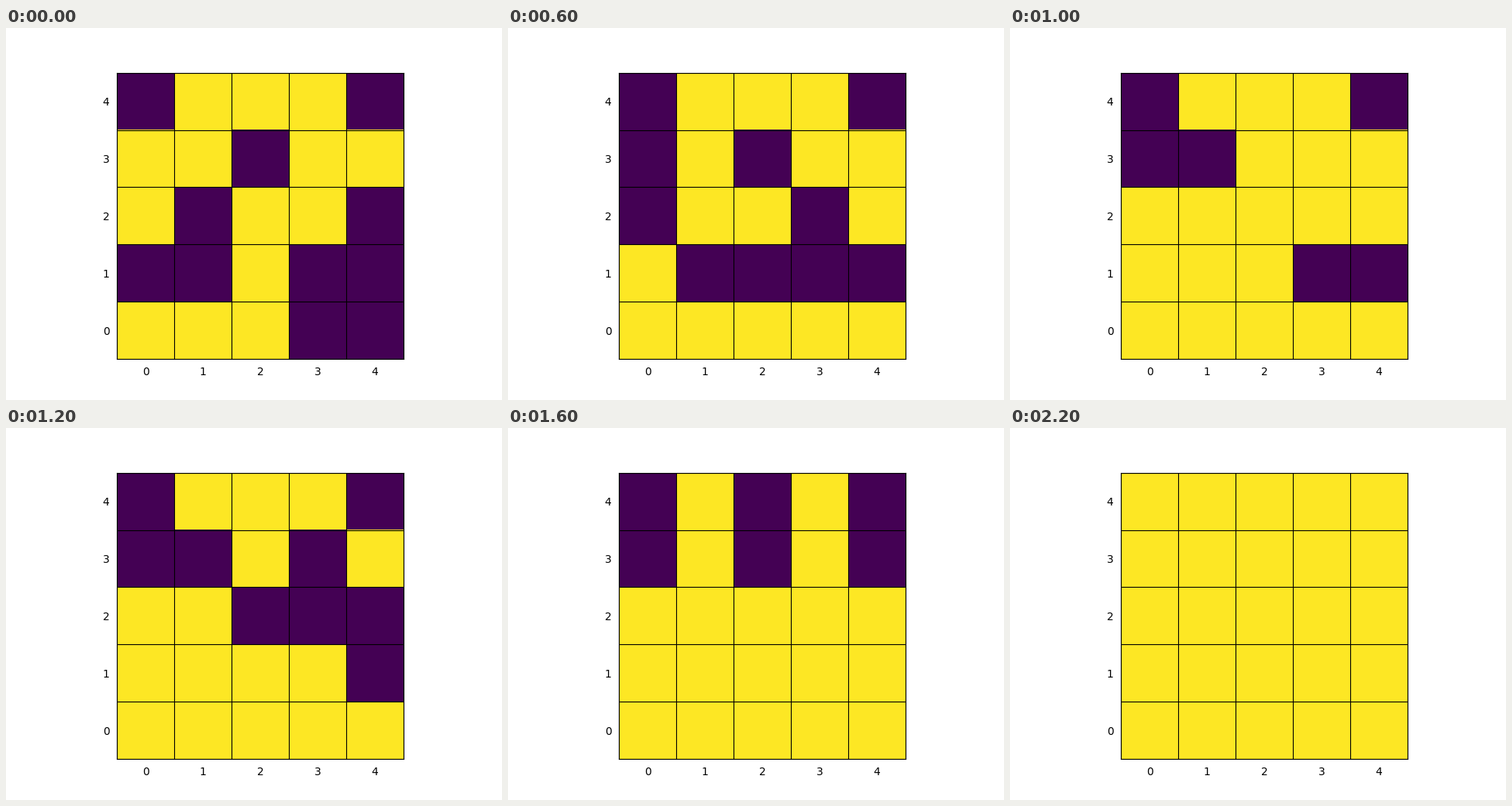
Write a matplotlib script that moves like this. It is 640 px wide and 480 px high and loops after 2400 ms.

```python
import numpy as np
import matplotlib.pyplot as plt
from matplotlib.animation import FuncAnimation

SIZE = 5
STEP_MS = 200

# Cells pressed in turn, as (column, row); together they solve the board.
PRESSES = [(3, 1), (4, 1), (0, 2), (1, 2), (2, 2), (3, 2), (4, 2),
           (2, 3), (0, 4), (2, 4), (4, 4)]

rows, cols = np.indices((SIZE, SIZE))


def press(board, cell):
    """Flip a cell and its direct neighbours."""
    col, row = cell
    return board ^ (abs(cols - col) + abs(rows - row) <= 1)


def board_at(step):
    """Board after `step` presses: the lit board with the rest undone."""
    board = np.ones((SIZE, SIZE), dtype=int)
    for cell in PRESSES[step:]:
        board = press(board, cell)
    return board


fig, ax = plt.subplots(figsize=(6.4, 4.8), dpi=100)
image = ax.imshow(board_at(0), origin="lower", cmap="viridis", vmin=0, vmax=1)

edges = np.arange(SIZE + 1) - 0.5
ax.set_xticks(range(SIZE))
ax.set_yticks(range(SIZE))
ax.set_xticks(edges, minor=True)
ax.set_yticks(edges, minor=True)
ax.grid(which="minor", color="black", linewidth=0.8)
ax.tick_params(which="both", bottom=False, left=False)


def update(step):
    image.set_data(board_at(step))
    return [image]


anim = FuncAnimation(fig, update, frames=len(PRESSES) + 1,
                     interval=STEP_MS, repeat=True, repeat_delay=0)
plt.show()
```
